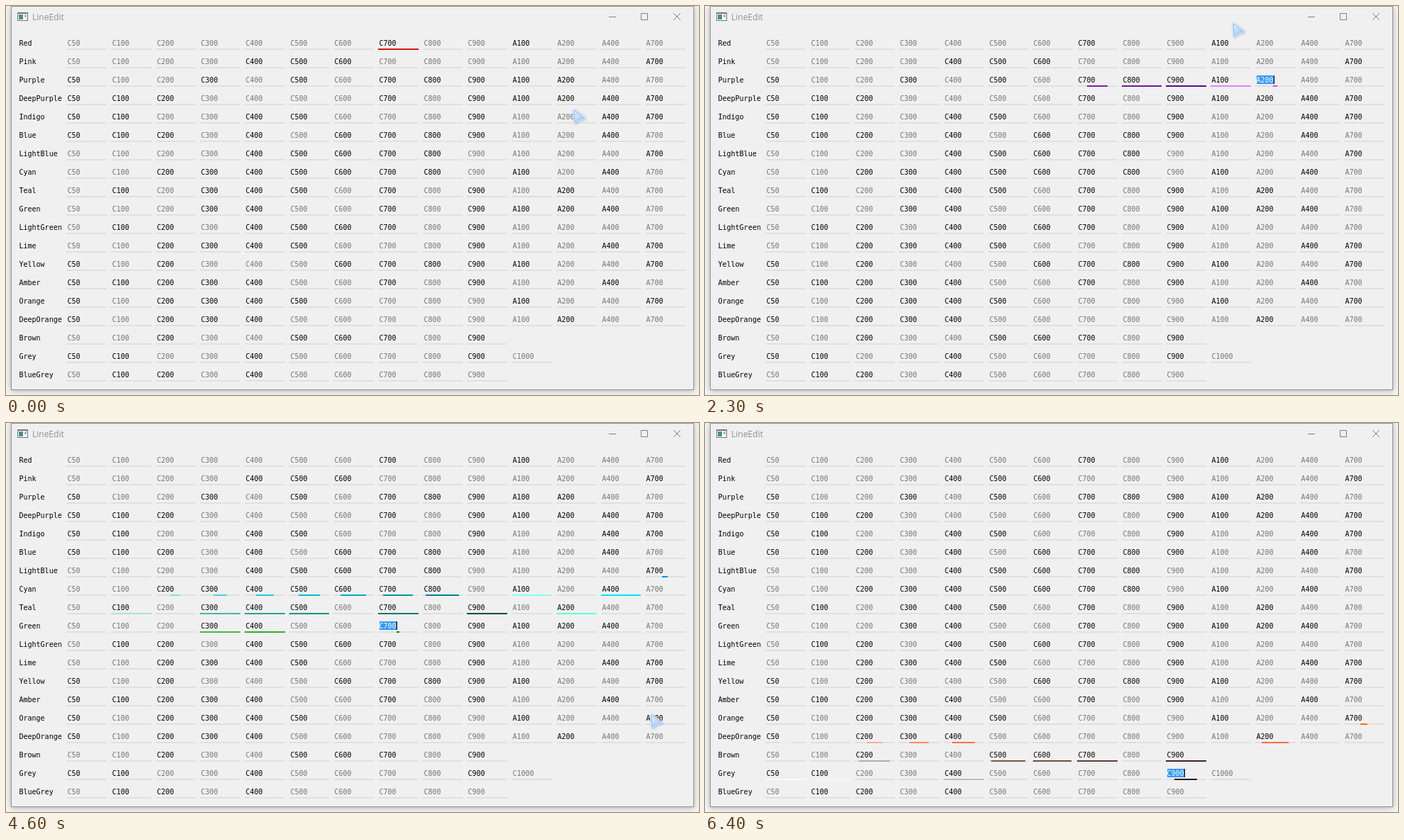
Animation of 976 by 549 pixels, one loop 6500 ms. Source, as an HTML page with a canvas:

```html
<!DOCTYPE html>
<html lang="en">
<head>
<meta charset="utf-8">
<title>LineEdit</title>
<style>
  html, body { margin: 0; width: 100%; height: 100%; overflow: hidden; background: #f4f4f4; }
  canvas { display: block; }
</style>
</head>
<body>
<canvas id="stage" width="976" height="549"></canvas>
<script>
const ctx = document.getElementById('stage').getContext('2d');
const LOOP = 6500, FRAME = 100;
const LINE_TIME = 310; // grow, hold and shrink each take this long
const SHADES = 'C50 C100 C200 C300 C400 C500 C600 C700 C800 C900 A100 A200 A400 A700'.split(' ');

// Enabled fields of each row with their line colour.
const ROWS = `
Red C700 d01716 A100 ff7997
Pink C400 ec407a C500 e91e63 C600 d81b60 A700 c51162
Purple C50 f3e5f5 C300 ba68c8 C500 9c27b0 C700 7b1fa2 C800 6a1b9a C900 4a148c A100 ea80fc A200 e040fb
DeepPurple C50 ede7f6 C100 d1c4e9 C200 b39ddb C700 512da8 C900 311b92 A100 b388ff A200 7c4dff A400 651fff A700 6200ea
Indigo C50 e8eaf6 C100 c5cae9 C400 5c6bc0 C500 3f51b5 C900 1a237e A400 3d5afe A700 304ffe
Blue C50 e7e9fd C100 d0d9ff C200 afbfff C400 738ffe C600 4e6cef C700 455ede C800 3b50ce C900 2a36b1 A400 4d73ff
LightBlue C400 29b6f6 C500 03a9f4 C600 039be5 C700 0288d1 C800 0277bd A700 0091ea
Cyan C200 80deea C300 4dd0e1 C400 26c6da C500 00bcd4 C600 00acc1 C700 0097a7 C800 00838f A100 84ffff A400 00e5ff
Teal C100 b2dfdb C300 4db6ac C400 26a69a C500 009688 C700 00796b C900 004d40 A200 64ffda
Green C300 42bd41 C400 2baf2b C700 0a7e07 C900 0d5302 A100 a2f78d A200 5af158 A400 14e715
LightGreen C100 dcedc8 C200 c5e1a5 C400 9ccc65 C500 8bc34a C600 7cb342 C700 689f38 C900 33691e
Lime C200 e6ee9c C300 dce775 C400 d4e157 C500 cddc39 C900 827717 A400 c6ff00 A700 aeea00
Yellow C50 fffde7 C200 fff59d C600 fdd835 C700 fbc02d C800 f9a825 C900 f57f17 A100 ffff8d A700 ffd600
Amber C50 fff8e1 C100 ffecb3 C200 ffe082 C300 ffd54f C400 ffca28 C700 ffa000 C900 ff6f00 A400 ffc400
Orange C50 fff3e0 C200 ffcc80 C300 ffb74d C400 ffa726 C500 ff9800 A100 ffd180 A700 ff6d00
DeepOrange C50 fbe9e7 C200 ffab91 C300 ff8a65 C400 ff7043 A200 ff6e40
Brown C200 bcaaa4 C500 795548 C600 6d4c41 C700 5d4037 C900 3e2723
Grey C50 fafafa C100 f5f5f5 C400 bdbdbd C900 212121
BlueGrey C100 cfd8dc C200 b0bec5 C400 78909c`.trim().split('\n').map(line => line.split(' '));

// Piecewise linear lookup in a list of [input, output, ...] points.
function interpolate(points, x, out = 1) {
  const next = points.findIndex(p => p[0] >= x);
  if (next < 0) return points.at(-1)[out];
  if (next === 0) return points[0][out];
  const a = points[next - 1], b = points[next];
  return a[out] + (b[out] - a[out]) * (x - a[0]) / (b[0] - a[0]);
}

// [field number, time it gets the focus]: single presses, then key repeat
const FOCUS = [[1, 780], [2, 985], [6, 1240], [7, 1370], [10, 1840], [11, 1995], [13, 2265],
  [14, 2400], [15, 2650], [16, 3154], [23, 3345], [26, 3485], [37, 3776], [63, 4576],
  [83, 5176], [118, 6226]];
const LAST = 118;

// [time, x, y] of the pointer tip
const POINTER = [[0, 798, 145], [300, 776, 92], [600, 742, 23], [4400, 742, 23],
  [4500, 828, 230], [4600, 907, 410], [4700, 948, 448]];
const POINTER_GONE = 4800;

const columnX = i => Math.floor(85.86 + 62.68 * i);

const fields = [];
let number = 0;
ROWS.forEach(([name, ...pairs], row) => {
  const colors = {};
  for (let i = 0; i < pairs.length; i += 2) colors[pairs[i]] = '#' + pairs[i + 1];
  const shades = name === 'Grey' ? [...SHADES.slice(0, 10), 'C1000']
    : row > 15 ? SHADES.slice(0, 10) : SHADES;
  shades.forEach((label, col) => {
    const x = columnX(col);
    const field = { label, x, width: columnX(col + 1) - x - 6, y: 52 + 26 * row, color: colors[label] };
    if (field.color) {
      const n = number++;
      field.gained = n === 0 ? -1000 : n > LAST ? Infinity : interpolate(FOCUS, n);
      field.lost = n === 0 ? -70 : n >= LAST ? Infinity : interpolate(FOCUS, n + 1);
    }
    fields.push(field);
  });
});

function rect(color, x, y, w, h) {
  ctx.fillStyle = color;
  ctx.fillRect(x, y, w, h);
}

function text(string, x, y, color) {
  ctx.fillStyle = color;
  ctx.fillText(string, x, y);
}

function drawWindow() {
  rect('#f4f4f4', 0, 0, 976, 549);
  ctx.save();
  ctx.shadowColor = 'rgba(0,0,0,.3)';
  ctx.shadowBlur = 8;
  ctx.shadowOffsetY = 1;
  rect('#929292', 7, 0, 962, 542);
  ctx.restore();
  rect('#f0f0f0', 8, 1, 960, 540);

  rect('#70767a', 16, 9, 15, 12);
  rect('#ffffff', 17, 11, 13, 9);
  rect('#4c9088', 18, 12, 6, 7);
  rect('#a8b4bc', 26, 12, 3, 4);

  ctx.font = '12px "Open Sans", sans-serif';
  text('LineEdit', 37, 20, '#909090');

  ctx.strokeStyle = '#808080';
  ctx.lineWidth = 1;
  ctx.beginPath();
  ctx.moveTo(849, 15.5); ctx.lineTo(859, 15.5);
  ctx.rect(894.5, 10.5, 9, 9);
  ctx.moveTo(940, 10); ctx.lineTo(950, 20);
  ctx.moveTo(950, 10); ctx.lineTo(940, 20);
  ctx.stroke();
}

function lineWidth({ gained, lost, width }, t) {
  if (t < gained) return 0;
  if (t < lost) return width * Math.min(1, (t - gained) / LINE_TIME);
  const w = width * Math.min(1, 2 - (t - lost) / LINE_TIME);
  return w < 7 ? 0 : w;
}

function drawField(field, t) {
  const { label, x, y, width, color } = field;
  rect('#e0e0e0', x, y + 8, width, 2);
  const w = color ? Math.round(lineWidth(field, t)) : 0;
  if (w > 0) rect(color, x + Math.floor((width - w) / 2), y + 8, w, 2);

  const selected = field.gained >= 0 && t >= field.gained && t < field.lost;
  if (selected) {
    const length = label.length * 6;
    rect('#3399ff', x + 2, y - 6, length, 12);
    rect('#000', x + 2 + length, y - 6, 1, 12);
  }
  text(label, x + 1.5, y + 4, selected ? '#fff' : color ? '#000' : '#747474');
}

function drawPointer(t) {
  if (t >= POINTER_GONE) return;
  ctx.save();
  ctx.translate(interpolate(POINTER, t, 1), interpolate(POINTER, t, 2));
  const fill = ctx.createLinearGradient(2, 2, 12, 18);
  fill.addColorStop(0, '#e4f1fe');
  fill.addColorStop(1, '#a6cff8');
  ctx.beginPath();
  ctx.moveTo(2, 2);
  ctx.lineTo(16, 13);
  ctx.lineTo(9, 14.5);
  ctx.lineTo(3, 19);
  ctx.closePath();
  ctx.lineJoin = 'round';
  ctx.shadowColor = 'rgba(70,110,170,.45)';
  ctx.shadowBlur = 3;
  ctx.shadowOffsetX = ctx.shadowOffsetY = 1;
  ctx.strokeStyle = '#d4e6fa';
  ctx.lineWidth = 3.5;
  ctx.stroke();
  ctx.shadowColor = 'transparent';
  ctx.fillStyle = fill;
  ctx.fill();
  ctx.strokeStyle = '#90c0f2';
  ctx.lineWidth = 1;
  ctx.stroke();
  ctx.restore();
}

function draw(now) {
  const t = Math.floor(now % LOOP / FRAME) * FRAME;
  drawWindow();
  ctx.font = '10px "DejaVu Sans Mono", monospace';
  ROWS.forEach(([name], row) => text(name, 18.5, 56 + 26 * row, '#000'));
  fields.forEach(field => drawField(field, t));
  drawPointer(t);
}

const start = performance.now();
function tick() {
  draw(performance.now() - start);
  requestAnimationFrame(tick);
}
tick();
</script>
</body>
</html>
```
